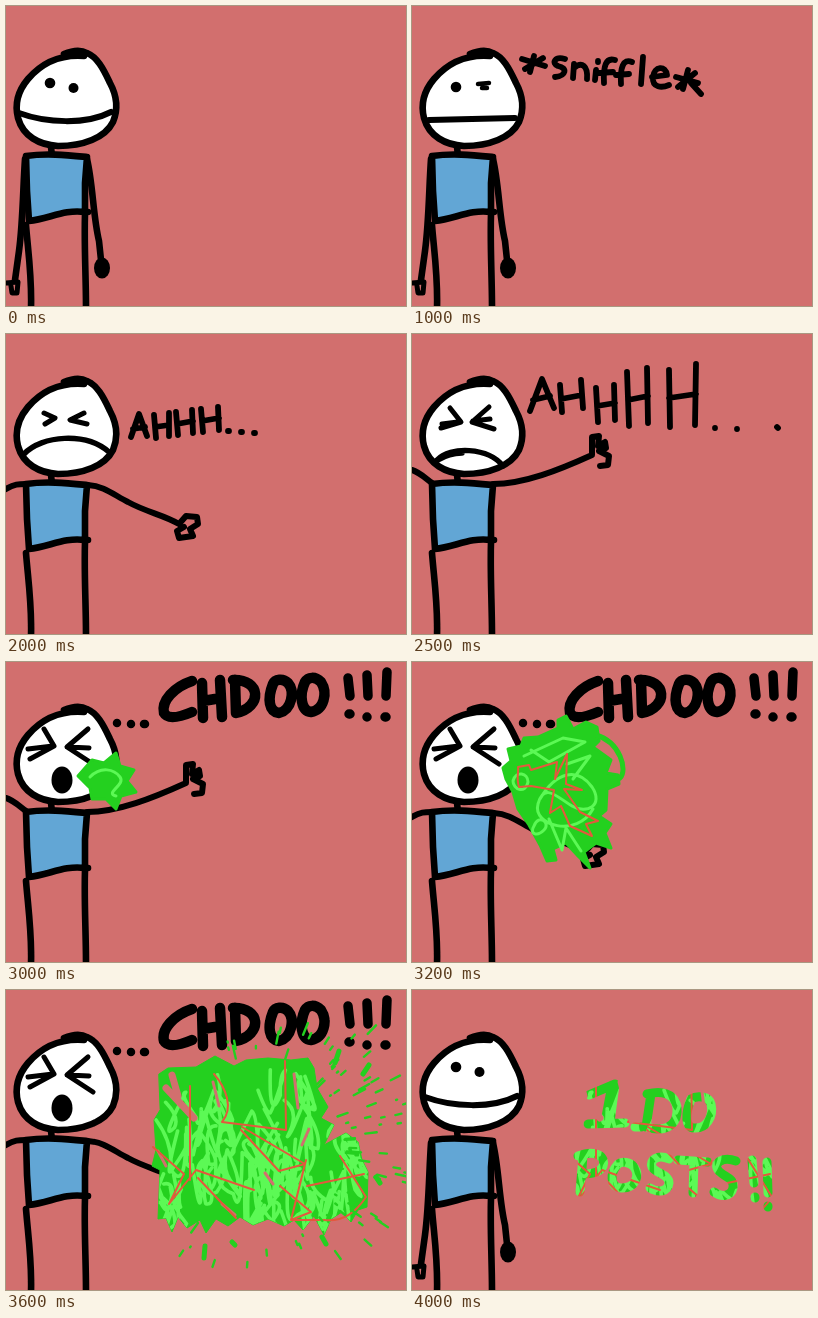
Write an HTML page that moves like this. It is 400x300 px and loops after 6 s.

```html
<!DOCTYPE html>
<html lang="en">
<head>
<meta charset="utf-8">
<title>Sneeze</title>
<style>
html, body { margin: 0; width: 100%; height: 100%; overflow: hidden; background: #d26f6e; }
svg { display: block; width: 100vw; height: 100vh; }
path { fill: none; stroke: #000; stroke-width: 6.6; stroke-linecap: round; stroke-linejoin: round; }
.eyes path { stroke-width: 5; }
.text path { stroke-width: 5.8; }
.bold path { stroke-width: 10.5; }
path.green { fill: #24d01f; stroke: #24d01f; stroke-width: 3; }
path.spray { stroke: #24d01f; }
path.light { stroke: #5cf955; stroke-width: 3; }
path.red { stroke: #e4583c; stroke-width: 2; }
path.gap { stroke: #d26f6e; }
#letters path { stroke: #fff; stroke-width: 9; }
.show { visibility: hidden; animation: 6s step-end infinite; }
.smile { animation-name: smile; }
.rest { animation-name: rest; }
.sniff { animation-name: sniff; }
.ah { animation-name: ah; }
.ahh { animation-name: ahh; }
.ahhh { animation-name: ahhh; }
.raised { animation-name: raised; }
.out { animation-name: out; }
.choo { animation-name: choo; }
.spit { animation-name: spit; }
.blob { animation-name: blob; }
.burst { animation-name: burst; }
.splash { animation-name: splash; }
.posts { animation-name: posts; }
@keyframes smile { 0% { visibility: visible } 16.6667% { visibility: hidden } 66.6667% { visibility: visible } }
@keyframes rest { 0% { visibility: visible } 25% { visibility: hidden } 66.6667% { visibility: visible } }
@keyframes sniff { 16.6667% { visibility: visible } 25% { visibility: hidden } }
@keyframes ah { 25% { visibility: visible } 33.3333% { visibility: hidden } }
@keyframes ahh { 33.3333% { visibility: visible } 41.6667% { visibility: hidden } }
@keyframes ahhh { 41.6667% { visibility: visible } 50% { visibility: hidden } }
@keyframes raised { 41.6667% { visibility: visible } 53.3333% { visibility: hidden } }
@keyframes out { 33.3333% { visibility: visible } 41.6667% { visibility: hidden } 53.3333% { visibility: visible } 66.6667% { visibility: hidden } }
@keyframes choo { 50% { visibility: visible } 66.6667% { visibility: hidden } }
@keyframes spit { 50% { visibility: visible } 53.3333% { visibility: hidden } }
@keyframes blob { 53.3333% { visibility: visible } 56.6667% { visibility: hidden } }
@keyframes burst { 56.6667% { visibility: visible } 60% { visibility: hidden } }
@keyframes splash { 60% { visibility: visible } 63.3333% { visibility: hidden } }
@keyframes posts { 63.3333% { visibility: visible } }
</style>
</head>
<body>
<svg viewBox="0 0 400 300" preserveAspectRatio="none">
<defs>
  <path id="shape" class="green" style="stroke-width:1" d="M153 84L162 78L190 77L209 66L228 76L240 70L262 68L285 70L302 68L308 78L311 98L322 117L315 128L328 135L318 155L340 143L352 152L356 170L362 182L361 217L352 220L345 232L336 222L325 229L318 245L308 226L297 240L288 230L278 236L262 229L247 235L234 227L222 236L210 229L200 243L194 230L181 238L172 227L166 242L160 228L152 229L154 180L146 176L150 160L148 130L154 120Z"/>
  <clipPath id="inside"><use href="#shape"/></clipPath>
  <g id="splat">
    <use href="#shape"/>
    <g clip-path="url(#inside)">
      <path class="light" id="swirls" style="stroke-width:3.6"/>
      <path class="gap" style="stroke-width:7" d="M160 98L188 128M166 85L172 106"/>
      <path class="gap" style="stroke-width:3" d="M207 92L213 116M288 84L292 118M216 214L229 225M303 139L296 155M152 161L160 176M259 183L267 194"/>
    </g>
    <path class="red" d="M184 96L184 190M208 84C220 98 228 118 216 132L280 140L279 70M236 137L299 174L273 181L235 140M300 170L285 230L305 222L274 196M147 157L178 184L163 214L190 180L248 200M192 188L230 228M301 196L358 184M334 166L360 207C350 222 338 232 318 230L285 230"/>
  </g>
  <mask id="letters" maskUnits="userSpaceOnUse" x="0" y="0" width="400" height="300">
    <path d="M177 105L203 94M200 95L193 132M203 95L198 132M176 134L213 133M223 137L229 137"/>
    <path d="M239 104L234 137M235 104C260 98 268 112 264 128C260 139 246 142 234 136M279 109C273 124 273 138 282 138C294 139 302 127 299 114C297 106 285 105 279 109"/>
    <path d="M171 166L168 202M166 166C185 159 194 167 191 176C188 183 178 184 171 184M206 174C197 184 198 198 210 198C224 198 228 185 222 177C218 172 210 171 206 174"/>
    <path d="M257 169C246 164 237 170 240 177C244 184 257 184 257 193C256 202 246 203 238 198M266 170L296 172M282 172L281 203M324 171C311 166 301 173 306 180C311 187 323 187 321 198C319 207 309 207 302 202"/>
    <path d="M340 170L342 193M343 207L343 208M355 172L356 203M356 216L356 217"/>
  </mask>
</defs>

<rect width="400" height="300" fill="#d26f6e"/>

<path style="fill:#fff" d="M78 50C52 48 34 59 22 73C11 86 9 100 12 112C17 130 33 139 52 140C77 140 99 132 107 116C112 104 111 90 104 77C97 62 91 51 81 47C74 43 65 45 58 48"/>
<path d="M45 141L46 150"/>
<path style="fill:#62a6d5" d="M20 150C40 147 60 149 81 151L79 177L79 206C58 203 43 213 23 215L21 185Z"/>
<path d="M78 206L82 206M20 219C22 245 26 270 25 302M79 208C78 240 80 270 80 302"/>

<g class="show smile">
  <circle cx="44" cy="77" r="5.3"/><circle cx="67.5" cy="82" r="5"/>
  <path style="stroke-width:6" d="M13 107C40 117 80 119 105 106"/>
</g>

<g class="show rest">
  <path d="M19 153C17 180 17 215 13 245L9 274M81 153C87 178 87 210 93 235L95 254"/>
  <path style="stroke-width:5" d="M0 277L12 276L11 287L6 287L5 280"/>
  <ellipse cx="96" cy="262" rx="8" ry="10.5"/>
</g>

<g class="show sniff">
  <circle cx="44" cy="81" r="5.3"/>
  <path style="stroke-width:4.5" d="M66 78L77 77M70 82L75 82"/>
  <path style="stroke-width:6" d="M17 114L103 112"/>
  <g class="text">
    <path d="M110 53L133 60M122 50L118 66M113 63L131 52M153 53C143 50 139 57 146 60C156 62 154 70 143 71M162 58L161 72M162 62C170 55 176 60 175 73M184 64L183 74M186 55L186 56M203 54C194 51 191 60 192 77M187 67L201 66M220 56C211 52 208 62 209 78M204 69L217 68M231 51L229 78M240 71L255 69C254 59 242 60 241 71C240 82 250 82 257 79M264 71L286 77M276 64L271 83M266 81L283 67M279 77L289 88"/>
  </g>
</g>

<g class="show ah">
  <g class="eyes"><path d="M38 79L49 84L39 90M78 79L64 86L81 90"/></g>
  <path d="M19 118C40 108 78 107 103 115M19 151L0 178M81 151C98 165 116 187 134 207L130 222L139 229L147 220L139 211"/>
  <g class="text">
    <path d="M125 87L133 59L143 86M128 77L140 75M152 60L152 87M168 58L168 86M152 73L168 72M180 86L180 86M193 86L193 86"/>
  </g>
</g>

<g class="show ahh">
  <g class="eyes"><path d="M38 79L49 84L39 90M78 79L64 86L81 90"/></g>
  <path style="stroke-width:5.5" d="M18 120C36 101 80 98 103 118"/>
  <g class="text">
    <path d="M125 103L133 80L141 102M127 95L139 93M148 81L150 104M163 79L163 102M149 93L163 91M170 78L172 101M186 76L187 99M171 90L187 87M195 75L197 98M212 73L213 96M196 87L213 84M222 97L223 97M235 98L236 98M248 99L249 99"/>
  </g>
</g>

<g class="show ahhh">
  <g class="eyes"><path d="M38 74L49 88L29 94M30 90L46 88M77 73L60 88L82 95M61 87L78 85"/></g>
  <path style="stroke-width:5.5" d="M25 126C38 112 76 113 91 132M26 126C34 121 42 119 50 119"/>
  <g class="text">
    <path d="M118 77L130 45L142 74M121 66L138 62M148 51L150 78M169 46L171 74M149 65L170 61M184 54L186 88M202 51L203 86M185 72L203 69M215 38L217 92M235 34L236 89M216 66L236 62M257 36L258 93M284 30L283 91M257 64L284 60M303 94L303 94M325 95L325 95M365 93L366 94"/>
  </g>
</g>

<g class="show raised">
  <path style="stroke-width:6" d="M0 136C7 138 12 143 20 149M81 150C112 150 147 136 180 121L180 103L187 102L186 112L193 108L194 114L187 117L197 122L196 131L188 132"/>
</g>

<g class="show out">
  <path style="stroke-width:6" d="M0 155C8 150 13 150 20 150M82 151C98 152 108 161 122 168C140 178 158 181 173 190L180 182L191 183L192 190L184 195L187 202L173 204L171 197L178 193"/>
</g>

<g class="show choo">
  <g class="eyes"><path d="M38 67L48 84L24 97M22 87L47 84M82 67L61 85L87 102M62 85L83 86"/></g>
  <ellipse cx="56" cy="118" rx="10.5" ry="13.5"/>
  <g class="bold">
    <path d="M186 19C168 25 155 39 158 51C162 58 174 55 186 50M196 21L197 56M214 18L216 55M197 39L215 36M229 18L230 51M227 18C255 17 257 45 230 51M267 22C261 37 263 50 273 51C286 48 289 29 282 21C277 16 269 17 267 22M299 20C293 33 295 49 305 50C318 48 322 31 315 20C309 14 302 15 299 20"/>
    <path style="stroke-width:9.5" d="M342 16L344 34M343 52L344 52M361 13L362 34M361 55L361 55M381 10L380 34M379 55L380 55"/>
    <path style="stroke-width:8.5" d="M111 61L111 61M125 62L125 62M138 62L139 62"/>
  </g>
</g>

<g class="show spit">
  <path class="green" d="M72 114L86 98L98 101L110 91L114 104L128 108L121 119L130 130L115 134L110 147L100 137L86 137L84 126Z"/>
  <path class="light" d="M84 115C95 104 108 107 114 115S98 131 110 134"/>
</g>

<g class="show blob">
  <path class="green" d="M94 117L91 106L99 99L96 87L109 84L112 76L126 75L146 66L146 58L154 54L161 67L174 60L185 65L187 79L181 85L199 98L194 111L206 113L207 122L195 127L194 148L187 154L199 162L193 171L199 186L184 181L172 190L178 206L166 194L154 181L141 187L144 198L135 199L128 183L117 163L106 147L101 130Z"/>
  <path class="spray" style="stroke-width:5" d="M184 73C208 80 216 108 208 116"/>
  <path class="light" d="M112 94L151 76L173 80L137 100L119 88M101 119C104 108 116 111 116 120C113 133 101 127 101 119M128 137C145 108 166 106 180 125C192 143 175 153 160 144S132 120 126 142S165 176 181 147M155 102L178 94L161 117M122 164C127 151 139 161 132 168S117 172 122 164M137 157L150 188L154 166L169 189"/>
  <path class="red" d="M106 105L117 103L119 108L145 100L143 117L155 92L154 122L170 128L152 127L168 150L186 159L174 162L180 174L158 164L149 144L138 151L142 128L119 124L107 125C104 116 107 109 106 105"/>
</g>

<g class="show burst">
  <use href="#splat" transform="translate(-60 6) scale(1.06 1)"/>
  <path class="spray drops" style="stroke-width:3"/>
</g>

<g class="show splash">
  <use href="#splat"/>
  <path class="spray drops" style="stroke-width:2.4"/>
  <path class="spray" style="stroke-width:5" d="M357 84L363 75M370 187L374 193M329 73L333 61M316 247L320 254M226 252L229 255M199 256L198 268"/>
</g>

<g class="show posts">
  <g mask="url(#letters)">
    <rect x="150" y="80" width="220" height="150" fill="#24d01f"/>
    <use href="#splat"/>
  </g>
</g>
</svg>
<script>
let seed = 41;
const rand = (a, b) => {
  seed = (seed * 16807) % 2147483647;
  return a + (b - a) * seed / 2147483647;
};
const point = (x, y) => x.toFixed(1) + ' ' + y.toFixed(1);

// Loose loops of lighter slime
let swirls = '';
for (let i = 0; i < 42; i++) {
  let x = rand(150, 350), y = rand(75, 215);
  swirls += 'M' + point(x, y);
  for (let k = 0; k < 4; k++) {
    const bend = point(x + rand(-18, 18), y + rand(-5, 30));
    x += rand(-14, 20);
    y += k % 2 ? rand(-45, -15) : rand(20, 50);
    swirls += 'Q' + bend + ' ' + point(x, y);
  }
}
document.getElementById('swirls').setAttribute('d', swirls);

// Droplets stretched away from the middle of the splash
let drops = '';
for (let i = 0; i < 95; i++) {
  const side = i % 5 < 3;
  const angle = side ? rand(-0.85, 0.6) : i % 5 < 4 ? rand(0.6, 2.2) : rand(-1.9, -0.8);
  const dx = Math.cos(angle), dy = Math.sin(angle);
  const far = side ? rand(85, 170) : rand(92, 150), length = rand(1, 13);
  const x = 250 + dx * far, y = 155 + dy * far * 0.95;
  if (y < 42 || y > 277) continue;
  drops += 'M' + point(x, y) + 'L' + point(x + dx * length, y + dy * length);
}
document.querySelectorAll('.drops').forEach(p => p.setAttribute('d', drops));
</script>
</body>
</html>
```
